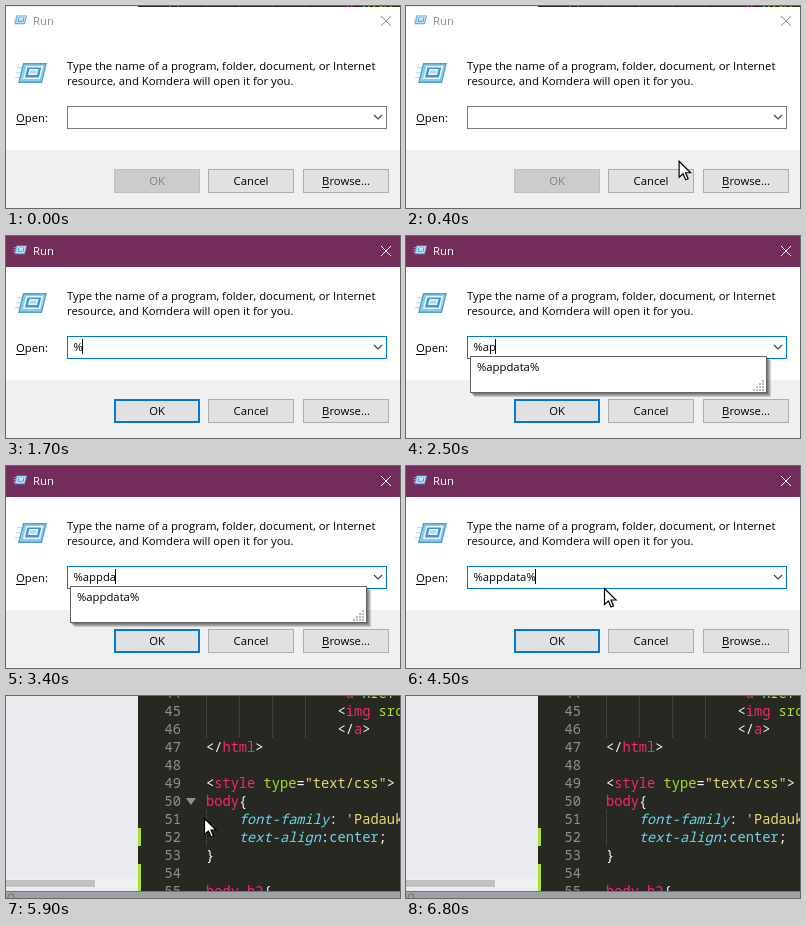
An HTML page with a canvas that plays this animation: 394x202 px, repeating every 6900 ms.

```html
<!DOCTYPE html>
<html lang="en">
<head>
<meta charset="utf-8">
<title>Run dialog</title>
<style>
html, body { margin: 0; width: 100%; height: 100%; overflow: hidden; background: #272822; }
canvas { display: block; width: 394px; height: 202px; }
</style>
</head>
<body>
<canvas id="stage"></canvas>
<script>
const W = 394, H = 202, LOOP = 6900, STEP = 100;
const ratio = window.devicePixelRatio || 1;
const stage = document.getElementById('stage');
const layer = document.createElement('canvas');
const [stageCtx, layerCtx] = [stage, layer].map(canvas => {
  canvas.width = W * ratio;
  canvas.height = H * ratio;
  const context = canvas.getContext('2d');
  context.scale(ratio, ratio);
  return context;
});
let ctx = stageCtx;

const UI = '11.3px "Open Sans", "Noto Sans", sans-serif';
const MONO = '13.7px "Noto Sans Mono", "DejaVu Sans Mono", monospace';
const COL = 8.22, LINE = 18, CODE_X = 200;
const BLUE = '#0078d7', PINK = '#f92672', GREEN = '#a6e22e', CYAN = '#66d9ef',
      YELLOW = '#e6db74', PALE = '#f8f8f2';

// Typed text by time
const TYPING = [[700, ''], [1600, '%'], [2300, '%a'], [2500, '%ap'], [2900, '%app'],
                [3400, '%appda'], [3600, '%appdata'], [4100, '%appdata%']];

// Code lines: number, indent, then pairs of colour and text (a leading / marks italics)
const CODE = [
  [44, 16, PALE, '<', PINK, 'a', GREEN, ' href', PALE, '='],
  [45, 16, PALE, '<', PINK, 'img', GREEN, ' src', PALE, '='],
  [46, 16, PALE, '</', PINK, 'a', PALE, '>'],
  [47, 0, PALE, '</', PINK, 'html', PALE, '>'],
  [48, 0],
  [49, 0, PALE, '<', PINK, 'style', GREEN, ' type', PALE, '=', YELLOW, '"text/css"', PALE, '>'],
  [50, 0, PINK, 'body', PALE, '{'],
  [51, 4, CYAN, '/font-family', PALE, ': ', YELLOW, "'Padauk"],
  [52, 4, CYAN, '/text-align', PALE, ':', CYAN, 'center', PALE, ';'],
  [53, 0, PALE, '}'],
  [54, 0],
  [55, 0, PINK, 'body h2', PALE, '{']
];

const clamp = v => Math.max(0, Math.min(1, v));
const ease = v => { v = clamp(v); return v * v * (3 - 2 * v); };
const lerp = (a, b, p) => a + (b - a) * p;
const mix = (a, b, p) => `rgb(${a.map((v, i) => Math.round(lerp(v, b[i], p)))})`;

function rect(x, y, w, h, fill) {
  ctx.fillStyle = fill;
  ctx.fillRect(x, y, w, h);
}

function box(x, y, w, h, fill, edge, weight = 1) {
  rect(x, y, w, h, edge);
  rect(x + weight, y + weight, w - 2 * weight, h - 2 * weight, fill);
}

function text(str, x, y, color = '#000', font = UI, align = 'left') {
  ctx.font = font;
  ctx.textAlign = align;
  ctx.fillStyle = color;
  ctx.fillText(str, x, y);
}

function path(points, closed) {
  ctx.beginPath();
  points.forEach(([x, y], i) => i ? ctx.lineTo(x, y) : ctx.moveTo(x, y));
  if (closed) ctx.closePath();
}

function stroke(points, color, width = 1) {
  path(points);
  ctx.strokeStyle = color;
  ctx.lineWidth = width;
  ctx.stroke();
}

function drawGuides(col, first, last) {
  const x = Math.round(CODE_X + col * COL);
  const end = 6 + LINE * (last - 44);
  for (let y = 6 + LINE * (first - 45); y < end; y += 2) rect(x, y, 1, 1, '#55554b');
}

function drawEditor(showFold) {
  rect(0, 0, W, H, '#272822');
  for (let col = 0; col < 16; col += 4) drawGuides(col, 44, 46);
  drawGuides(0, 51, 52);
  for (const [num, indent, ...parts] of CODE) {
    const y = 20 + LINE * (num - 45);
    let x = CODE_X + indent * COL;
    text(String(num), 175, y, '#8f908a', MONO, 'right');
    for (let i = 0; i < parts.length; i += 2) {
      const italic = parts[i + 1].startsWith('/');
      const str = italic ? parts[i + 1].slice(1) : parts[i + 1];
      text(str, x, y, parts[i], (italic ? 'italic ' : '') + MONO);
      x += str.length * COL;
    }
  }
  rect(132, 132, 3, 18, GREEN);
  rect(132, 168, 3, 27, GREEN);
  if (showFold) {
    path([[180, 102], [190, 102], [185, 109]], true);
    ctx.fillStyle = '#8f908a';
    ctx.fill();
  }
  rect(0, 0, 132, 195, '#e9ebee');
  rect(0, 183, 132, 9, '#f1f1f1');
  rect(0, 184, 89, 7, '#c1c1c1');
  rect(0, 195, W, 7, '#9da1a8');
  rect(0, 195, W, 1, '#74777c');
  ctx.beginPath();
  ctx.arc(5, 201, 3, 0, 7);
  ctx.strokeStyle = '#6e7278';
  ctx.lineWidth = 1;
  ctx.stroke();
}

function drawIcon(x, y, size) {
  ctx.save();
  ctx.translate(x, y);
  ctx.scale(size, size);
  for (let i = 0; i < 3; i++) rect(2 - i, 5 + i * 5, 8, 1.2, '#b9def0');
  ctx.transform(1, 0, -0.25, 1, 8, 1);
  box(0, 0, 24, 20, '#8ecbe9', '#4f9fcf', 1.4);
  box(4, 3, 17, 13, '#3d96cd', '#e8f6fd', 1.6);
  box(8, 6, 9, 6, '#a9d8f0', '#e8f6fd', 1.4);
  ctx.restore();
}

function button(label, x, state) {
  const [fill, edge, weight, ink] = {
    off: ['#cccccc', '#bfbfbf', 1, '#838383'],
    main: ['#e1e1e1', BLUE, 2, '#000'],
    plain: ['#e1e1e1', '#adadad', 1, '#000']
  }[state];
  box(x, 163, 86, 24, fill, edge, weight);
  text(label, x + 43, 179, ink, UI, 'center');
}

function drawDropdown() {
  for (let i = 4; i > 0; i--) rect(64 + i, 120 + i, 297, 37, 'rgba(0,0,0,.16)');
  box(64, 120, 297, 37, '#fff', '#646464');
  text('%appdata%', 71, 135);
  for (let r = 0; r < 4; r++)
    for (let c = 3 - r; c < 4; c++) rect(347 + c * 3, 144 + r * 3, 2, 2, '#bcbcbc');
}

function drawDialog(t) {
  const closing = t >= 4900;
  const focus = t >= 500;
  const glow = focus ? 1 - Math.exp((400 - t) / 120) : 0;
  const [keyTime, typed] = TYPING.filter(([time]) => time <= t).pop() || [0, ''];

  const top = focus ? 0 : 1;
  rect(0, top, W, 31 - top, mix([255, 255, 255], [116, 45, 90], glow));
  rect(0, 31, W, 113, '#fff');
  rect(0, 144, W, 58, '#f0f0f0');
  const ink = mix([140, 140, 140], [255, 255, 255], glow);
  drawIcon(7, 9, 0.44);
  text('Run', 27, 19, ink);
  stroke([[375, 10], [385, 20]], ink);
  stroke([[385, 10], [375, 20]], ink);

  drawIcon(9, 56, 1);
  text('Type the name of a program, folder, document, or Internet', 61, 64);
  text('resource, and Komdera will open it for you.', 61, 79);
  text('Open:', 10, 116);
  rect(10, 118, 9, 1, '#000');

  box(61, 100, 320, 23, '#fff', focus ? BLUE : '#7a7a7a');
  stroke([[368, 109], [372, 113], [376, 109]], '#444', 1.2);
  if (closing) rect(67, 103, 64, 16, BLUE);
  text(typed, 67.5, 115, closing ? '#fff' : '#000');
  const blinkOn = Math.floor((t - keyTime) / 530) % 2 === 0;
  if (focus && !closing && blinkOn) {
    rect(67 + Math.floor(ctx.measureText(typed).width), 103, 1, 15, '#000');
  }

  button('OK', 108, typed ? 'main' : 'off');
  button('Cancel', 202, 'plain');
  button('Browse...', 297, 'plain');
  rect(316, 181, 7, 1, '#000');
  if (t >= 2100 && t < 4300) drawDropdown();
}

function drawMouse(t) {
  if (t < 100 || t >= 1600 && t < 4400 || t >= 6400) return;
  const enter = ease((t - 100) / 500), leave = ease((t - 5900) / 500);
  const x = t < 4400 ? lerp(410, 198, enter) : lerp(198, 330, leave);
  const y = t < 4400 ? lerp(215, 122, enter) : lerp(122, 215, leave);
  ctx.save();
  ctx.translate(x + 0.5, y + 0.5);
  path([[0, 0], [0, 16], [4, 12.5], [6.5, 18.5], [9, 17.5], [6.5, 11.5], [11.5, 11.5]], true);
  ctx.fillStyle = '#fff';
  ctx.fill();
  ctx.strokeStyle = '#000';
  ctx.lineWidth = 1.2;
  ctx.stroke();
  ctx.restore();
}

// The dialog fades as one flat picture while it shrinks
function fadeDialog(t, out) {
  ctx = layerCtx;
  ctx.clearRect(0, 0, W, H);
  drawDialog(t);
  ctx = stageCtx;
  const size = 1 - 0.042 * out;
  ctx.save();
  ctx.globalAlpha = Math.pow(1 - out, 1.35);
  ctx.translate(200, 101);
  ctx.scale(size, size);
  ctx.drawImage(layer, -200, -101, W, H);
  ctx.restore();
}

function draw(t) {
  const out = clamp((t - 4900) / 360);
  drawEditor(t >= 4900 && t < 6400);
  if (out === 0) drawDialog(t);
  else if (out < 1) fadeDialog(t, out);
  drawMouse(t);
}

const start = performance.now();
function tick() {
  const t = (performance.now() - start) % LOOP;
  draw(Math.floor(t / STEP) * STEP);
  requestAnimationFrame(tick);
}
tick();
</script>
</body>
</html>
```
